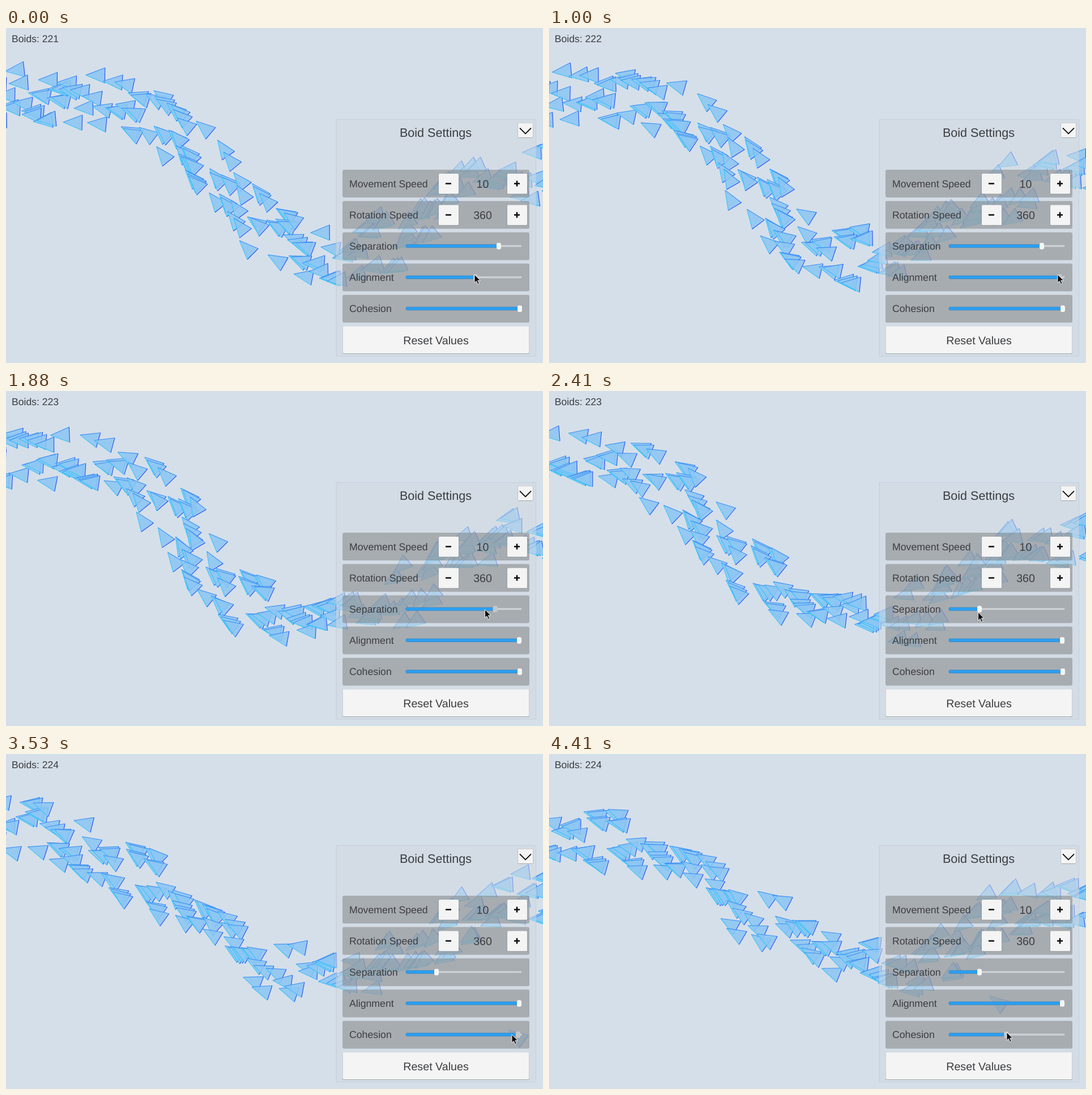
Animation, 948 px wide and 591 px high, one loop 4.47 s. Source, as an HTML page with a canvas:

```html
<!DOCTYPE html>
<html lang="en">
<head>
<meta charset="utf-8">
<title>Boids</title>
<style>
  html, body { margin: 0; width: 100%; height: 100%; overflow: hidden; background: #d5dfe9; }
  canvas, svg { position: absolute; left: 0; top: 0; width: 948px; height: 591px; }
  text { font: 17.7px "Liberation Sans", Arial, sans-serif; fill: #3c3d40; text-rendering: geometricPrecision; }
  .row { fill: #7d7e7f; fill-opacity: .5; }
  .btn { fill: #f4f4f4; }
  .shade { fill: #84878b; fill-opacity: .6; }
  .mid { text-anchor: middle; }
  .num { font-size: 19.6px; }
  .sign { stroke: #0c0c0c; stroke-width: 2.6; fill: none; }
</style>
</head>
<body>
<canvas width="948" height="591"></canvas>
<svg viewBox="0 0 948 591">
  <text id="count" x="10" y="25" style="font-size:17.6px">Boids: 221</text>
  <rect x="583" y="161.5" width="352.5" height="417.5" fill="#d2dae2" fill-opacity=".52" stroke="#bcc6cf" stroke-opacity=".6"/>
  <text class="mid" x="758.5" y="192" style="font-size:21.6px">Boid Settings</text>
  <rect class="shade" x="903.5" y="167" width="27" height="27" rx="2"/>
  <rect class="btn" x="904" y="167.5" width="26" height="25.5" rx="1"/>
  <path d="M907 176.500 917 186.500 927 176.500" fill="none" stroke="#111" stroke-width="1.8"/>
  <g id="rows"></g>
  <rect class="shade" x="594" y="527" width="330" height="48" rx="2"/>
  <rect class="btn" x="594.5" y="526.5" width="329" height="47.500" rx="2"/>
  <text class="mid" x="759" y="557.500" style="font-size:19.700px">Reset Values</text>
  <path id="cursor" d="M0 0V14.500L3.300 11.400 5.900 17 8.300 15.900 5.800 10.400H10.400Z" fill="#080808" stroke="#fff" stroke-width=".9"/>
</svg>
<script>
const LOOP = 4470, HOLD = 120, STEP = 58.77, SPEED = .146;
const ctx = document.querySelector('canvas').getContext('2d');
const $ = id => document.getElementById(id);

// Panel rows
const stepper = (label, val) => y => `
  <text x="606" y="${y + 30.5}">${label}</text>
  ${[764, 885].map(x => `<rect class="shade" x="${x - .5}" y="${y + 7}" width="36" height="36.5" rx="1.5"/>
  <rect class="btn" x="${x}" y="${y + 7}" width="35" height="35.5" rx="1.5"/>`).join('')}
  <path class="sign" d="M776 ${y + 24.5}h10M897 ${y + 24.5}h10m-5-5v10"/>
  <text class="mid num" x="841.5" y="${y + 31.5}">${val}</text>`;
const slider = (label, id) => y => `
  <text x="606" y="${y + 30.5}">${label}</text>
  <rect x="706" y="${y + 22}" width="205" height="4.4" rx="2" fill="#cdd0d4" stroke="#999ea3" stroke-width=".6"/>
  <rect id="${id}Fill" x="706" y="${y + 21.5}" height="5.4" rx="2" fill="#2b9ff2" stroke="#3580b8" stroke-width=".7"/>
  <rect id="${id}Knob" y="${y + 18.6}" width="8" height="11.5" rx="3"/>`;
$('rows').innerHTML = [
  stepper('Movement Speed', 10), stepper('Rotation Speed', 360),
  slider('Separation', 'sep'), slider('Alignment', 'ali'), slider('Cohesion', 'coh')
].map((row, i) => {
  const y = 250 + i * 55.2;
  return `<rect class="row" x="594" y="${y}" width="330" height="49" rx="3"/>` + row(y);
}).join('');

// Piecewise linear value over [ms, value] keys
function track(keys, t) {
  let i = 0;
  while (i < keys.length - 2 && t > keys[i + 1][0]) i++;
  const [a, va] = keys[i], [b, vb] = keys[i + 1];
  return va + (vb - va) * Math.min(1, Math.max(0, (t - a) / (b - a)));
}

// The pointer rests at or passes through these spots
const pointerX = [[0, 827], [1000, 898], [1880, 846], [2410, 757], [2880, 894], [3530, 893], [4410, 808]];
const pointerY = [[1250, 435], [1700, 384], [2410, 390], [2880, 484], [3530, 495], [4410, 491]];
const drags = {
  ali: [[0, 829], [1060, 906]],
  sep: [[1850, 870], [2410, 760]],
  coh: [[3500, 907], [4440, 804]]
};

// Middle of the stream: a fall around a drifting bend, then a rise
const sigmoid = u => 1 / (1 + Math.exp(-u));
const bendAt = t => track([[0, 370], [2880, 300], [3530, 300], [4410, 340]], t);
const widthAt = t => track([[0, 60], [1880, 56], [4410, 120]], t);

// Samples of the stream with arc length s, zero at x = 400
function curveAt(t) {
  const bend = bendAt(t), width = widthAt(t), pts = [];
  let s = 0;
  for (let x = -700; x <= 1900; x += 5) {
    const y = 116 + 304 * sigmoid((x - bend) / width) - 170 * sigmoid((x - 740) / 55);
    const q = pts[pts.length - 1];
    if (q) s += Math.hypot(5, y - q.y);
    pts.push({ x, y, s });
  }
  const zero = pts.find(p => p.x >= 400).s;
  pts.forEach(p => p.s -= zero);
  return pts;
}

function along(pts, s) {
  let lo = 0, hi = pts.length - 1;
  while (hi - lo > 1) {
    const m = (lo + hi) >> 1;
    if (pts[m].s > s) hi = m; else lo = m;
  }
  const a = pts[lo], b = pts[hi], len = b.s - a.s, tx = (b.x - a.x) / len, ty = (b.y - a.y) / len;
  return { x: a.x + tx * (s - a.s), y: a.y + ty * (s - a.s), tx, ty };
}

let seed = 71;
const rnd = () => (seed = (seed * 16807) % 2147483647) / 2147483647;
const spread = r => (rnd() * 2 - 1) * r;

// Boids at even gaps with jitter, some with a close follower
const boids = [];
for (let s = -560; s < 1330; s += 9) {
  const b = { s: s + spread(5), off: spread(48), turn: spread(.15) };
  boids.push(b);
  if (rnd() < .42) boids.push({ s: b.s + 5 + spread(2), off: b.off + spread(3), turn: b.turn + spread(.05) });
}

function line(color, a, b) {
  ctx.strokeStyle = color;
  ctx.beginPath();
  ctx.moveTo(...a);
  ctx.lineTo(...b);
  ctx.stroke();
}

function drawBoid(x, y, angle) {
  const c = Math.cos(angle), s = Math.sin(angle);
  const at = (u, v) => [x + u * c - v * s, y + u * s + v * c];
  const tip = at(22, 0), top = at(-11.5, 13.5), low = at(-11.5, -13.5);
  ctx.fillStyle = 'rgba(140,199,243,.88)';
  ctx.beginPath();
  ctx.moveTo(...tip);
  ctx.lineTo(...top);
  ctx.lineTo(...low);
  ctx.fill();
  line('#36c3fb', tip, low);
  line('#3b8ff5', tip, top);
  line('#284df0', top, low);
}

function draw(t) {
  const pts = curveAt(t);
  ctx.clearRect(0, 0, 948, 591);
  ctx.lineWidth = 1.1;
  for (const b of boids) {
    const p = along(pts, b.s - t * SPEED);
    const x = p.x - p.ty * b.off, y = p.y + p.tx * b.off;
    if (x > -30 && x < 980) drawBoid(x, y, Math.atan2(-p.ty, -p.tx) + b.turn);
  }
  // A lone straggler joins late from the right
  const late = t - 3530;
  drawBoid(905 - .125 * late, 500 - .068 * late, -2.5);

  for (const id in drags) {
    const keys = drags[id], x = track(keys, t), held = t >= keys[0][0] && t <= keys[1][0];
    $(id + 'Fill').setAttribute('width', x - 706);
    $(id + 'Knob').setAttribute('x', x - 4);
    $(id + 'Knob').setAttribute('fill', held ? '#c3c6c9' : '#f5f5f5');
  }
  $('count').textContent = 'Boids: ' + (221 + [500, 1350, 3200].filter(born => t >= born).length);
  $('cursor').setAttribute('transform', `translate(${track(pointerX, t)} ${track(pointerY, t)})`);
}

const begin = performance.now();
let shown = -1;
function frame() {
  const now = (performance.now() - begin) % LOOP;
  const t = now < HOLD ? 0 : HOLD + Math.floor((now - HOLD) / STEP + .12) * STEP;
  if (t !== shown) draw(shown = t);
  requestAnimationFrame(frame);
}
frame();
</script>
</body>
</html>
```
